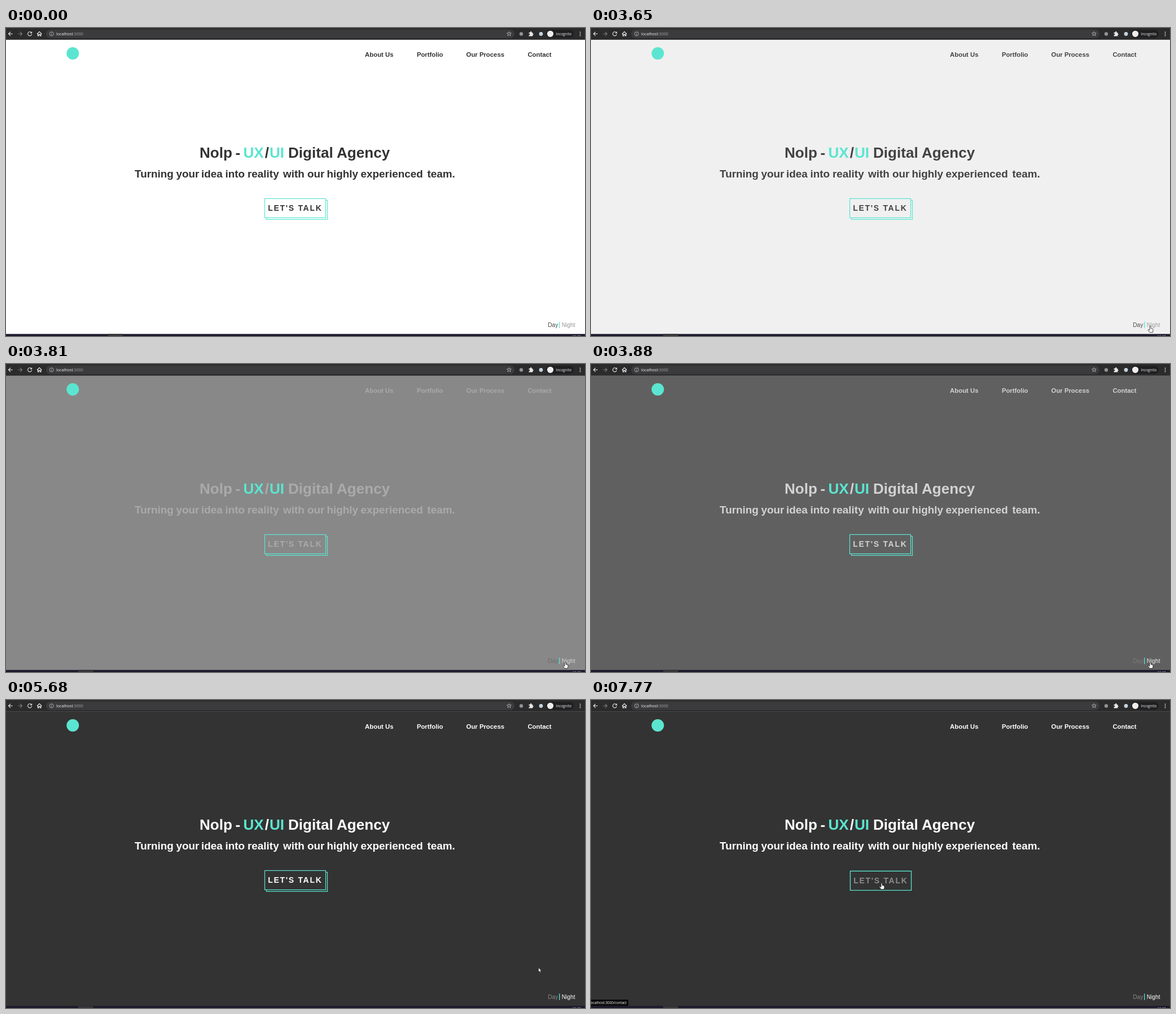
An HTML page for the animation above (8 s loop, 1026 by 546 pixels).

```html
<!DOCTYPE html>
<html lang="en">
<head>
<meta charset="utf-8">
<title>Agency landing page</title>
<style>
  html, body { margin: 0; width: 100%; height: 100%; overflow: hidden; background: #fff; }
  svg { display: block; width: 100vw; height: 100vh; overflow: hidden; }
  text { white-space: pre; }
  .page { font-family: "Liberation Sans", Arial, sans-serif; font-weight: 700; }
  .ui { font-family: "Open Sans", "Noto Sans", sans-serif; font-weight: 400; }
  .nav { font-size: 11.35px; text-anchor: middle; }
  .toggle { font-size: 10.2px; font-weight: 400; }
  .icon { fill: none; stroke: #f1f1f1; stroke-width: 1.1; }
  .teal { fill: #5be5d0; }
  .frame { stroke: #5be5d0; stroke-width: 1.2; }
</style>
</head>
<body>
<svg viewBox="0 0 1026 546" preserveAspectRatio="none">
  <rect id="bg" y="20" width="1026" height="523"/>

  <g class="ui">
    <rect width="1026" height="20" fill="#2b2b2c"/>
    <rect y="20" width="1026" height="1" fill="#4a4a4c"/>
    <rect x="71" y="2.6" width="830" height="15.4" rx="7.7" fill="#3b3b3d"/>
    <path class="icon" d="M11.8 10.3H4.5M8 6.8L4.5 10.3 8 13.8"/>
    <path class="icon" style="stroke:#818184" d="M21.2 10.3H28.5M25 6.8L28.5 10.3 25 13.8"/>
    <path class="icon" d="M44.7 8A3.5 3.5 0 1 0 45.5 11M45.6 6.4V9H43"/>
    <path class="icon" d="M55 10.6L59.2 6.5 63.4 10.6M56.4 9.6V14H58V11.4H60.4V14H62V9.6"/>
    <g class="icon" style="stroke:#c4c4c6;stroke-width:.8">
      <circle cx="80.8" cy="10.3" r="3.5"/><path d="M80.8 9.8V12.4M80.8 8.2V9"/>
      <path d="M891.5 6.3L892.6 9H895.4L893.2 10.8 894 13.6 891.5 12 889 13.6 889.8 10.8 887.6 9H890.4Z"/>
    </g>
    <text x="89" y="12.9" font-size="7.1" fill="#f5f5f5">localhost<tspan fill="#a5a5a8">:3000</tspan></text>
    <circle cx="913" cy="10.5" r="3.2" fill="#8e9298"/>
    <path fill="#e6e6e6" d="M926.5 8H928.8A1.4 1.4 0 1 1 931.4 8H933.3V10A1.3 1.3 0 1 1 933.3 12.6V14.4H926.5V12.2A1.2 1.2 0 1 0 926.5 10Z"/>
    <circle cx="948" cy="10.5" r="3.4" fill="#c3d2df"/>
    <rect x="957" y="3.6" width="49" height="13.6" rx="6.8" fill="#1f1f21"/>
    <circle cx="964.5" cy="10.3" r="5.6" fill="#eeeeee"/>
    <text x="974.5" y="12.6" font-size="6.4" fill="#f1f1f1">Incognito</text>
    <g fill="#e4e4e4"><circle cx="1017.5" cy="7.4" r=".9"/><circle cx="1017.5" cy="10.4" r=".9"/><circle cx="1017.5" cy="13.4" r=".9"/></g>
  </g>

  <circle class="teal" cx="118.3" cy="45" r="11"/>

  <g class="page" id="copy">
    <g class="nav">
      <text x="661.3" y="51">About Us</text>
      <text x="751.2" y="51">Portfolio</text>
      <text x="849.3" y="51">Our Process</text>
      <text x="945.5" y="51">Contact</text>
    </g>
    <text y="229.8" font-size="26.1"><tspan x="343">Nolp</tspan><tspan x="406.5">-</tspan><tspan class="teal" x="420.5">UX</tspan><tspan x="458.8">/</tspan><tspan class="teal" x="467">UI</tspan><tspan x="500">Digital Agency</tspan></text>
    <text id="tagline" y="265" font-size="18.9"></text>
  </g>

  <rect class="frame" id="back" width="108" height="34"/>
  <g id="front">
    <rect class="frame" id="face" x="458.5" y="302.4" width="108" height="34"/>
    <text class="page" id="label" x="464.2" y="324.1" font-size="14" letter-spacing="1.7">LET'S TALK</text>
  </g>

  <g class="page toggle">
    <text id="day" x="960.2" y="530">Day</text>
    <rect class="teal" x="980.1" y="520.5" width="1.3" height="11.5"/>
    <text id="night" x="984.7" y="530">Night</text>
  </g>

  <g class="ui" id="status">
    <rect x="-3" y="531" width="69.2" height="11.3" rx="1" fill="#080808"/>
    <text x="-2" y="538.7" font-size="6.2" fill="#fff">localhost:3000/contact</text>
  </g>

  <rect y="542.4" width="1026" height="4" fill="#1b1a2b"/>
  <rect id="task" y="542.4" width="26.5" height="4" fill="#353638"/>
  <text class="ui" x="1003.5" y="549.2" font-size="6" fill="#fff">10:05</text>

  <g id="cursor" fill="#fff" stroke="#111" stroke-width=".7" stroke-linejoin="round">
    <path id="arrow" d="M0 0V8.2L1.8 6.6 3.1 9.5 4.4 8.9 3.1 6.1H5.5Z"/>
    <path id="hand" d="M-1 1Q0 -.8 1 1V4.5L4 5.2Q5 5.6 5 7L4.3 11.6H-1L-4 7.3Q-3.6 6 -2.4 6.8L-1 8Z"/>
  </g>
</svg>
<script>
const LOOP = 8000;
const $ = id => document.getElementById(id);
const lerp = (a, b, p) => a + (b - a) * p;
const clamp = p => Math.max(0, Math.min(1, p));
const grey = v => `rgb(${[v, v, v].map(Math.round)})`;
const set = (id, name, value) => $(id).setAttribute(name, value);
const smooth = p => p * p * (3 - 2 * p);
const linear = p => p;

const words = [['Turning', 228], ['your', 301.5], ['idea', 346], ['into', 388.5], ['reality', 428],
  ['with', 491], ['our', 534], ['highly', 568.5], ['experienced', 628.5], ['team.', 746.5]];
$('tagline').innerHTML = words.map(([w, x]) => `<tspan x="${x}">${w}</tspan>`).join('');

// start, end, steps, from, to, easing
const moves = [
  [160, 220, 2, [943, 532], [913, 534], linear],
  [500, 640, 3, [913, 534], [921, 549], linear],
  [1480, 2240, 11, [943.5, 541], [991, 528], linear],
  [4770, 5540, 12, [991, 528], [951.5, 479.5], linear],
  [5610, 6380, 12, [951.5, 479.5], [860.5, 418.5], p => p ** 1.36],
  [6450, 7240, 12, [860.5, 418.5], [522, 325], smooth],
  [7310, 7770, 7, [522, 325], [515, 324], smooth]
];

// time, progress from day to night
const fade = [[0, 0], [3650, .074], [3720, .31], [3810, .583], [3870, .78], [3940, 1]];

function pointer(t) {
  const move = moves.filter(m => t >= m[0]).pop();
  if (!move) return [-50, -50];
  const [a, b, n, from, to, ease] = move;
  const step = Math.floor((t - a) / (b - a) * (n - 1) + .1) + 1;
  const p = ease(clamp(step / n));
  return [lerp(from[0], to[0], p), lerp(from[1], to[1], p)];
}

function draw(t) {
  const night = fade.filter(f => t >= f[0]).pop()[1];
  const paper = lerp(255, 51, night), ink = lerp(51, 255, night);
  set('bg', 'fill', grey(paper));
  set('copy', 'fill', grey(ink));
  set('day', 'fill', grey(lerp(70, 136, night)));
  set('night', 'fill', grey(lerp(150, 255, night)));
  set('task', 'x', t < 3510 ? 180.5 : 128);

  const tick = Math.floor((t - 7170) / 70) * 70;
  const hover = clamp(tick / 280);
  set('back', 'x', lerp(461.5, 459.5, hover));
  set('back', 'y', lerp(305.4, 303.4, hover));
  set('back', 'fill', grey(paper));
  set('face', 'fill', grey(paper));
  set('front', 'transform', `translate(${hover} ${hover})`);
  set('label', 'fill', grey(lerp(ink, 140, hover)));
  set('status', 'opacity', clamp((tick - 210) / 210));

  const [x, y] = pointer(t);
  const onToggle = t >= 2310 && t < 5540 && x > 982 && y > 519;
  const hand = onToggle || t >= 7170;
  set('cursor', 'transform', `translate(${x} ${y})`);
  set('hand', 'visibility', hand ? 'visible' : 'hidden');
  set('arrow', 'visibility', hand ? 'hidden' : 'visible');
}

const start = performance.now();
function loop() {
  draw((performance.now() - start) % LOOP);
  requestAnimationFrame(loop);
}
loop();
</script>
</body>
</html>
```
